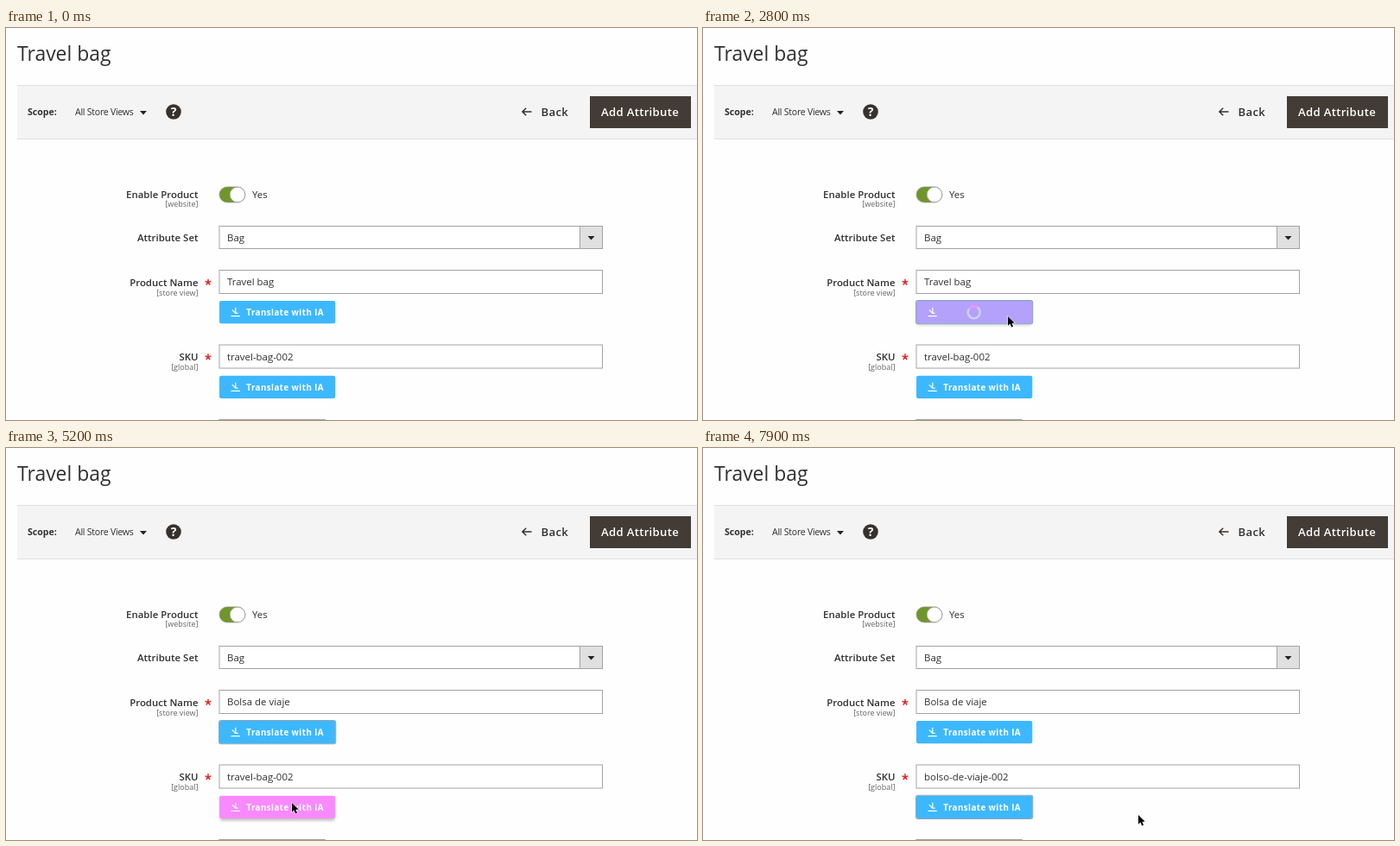
An HTML page that plays this animation: 800x454 px, repeating every 8000 ms.

```html
<!DOCTYPE html>
<html lang="en">
<head>
<meta charset="utf-8">
<title>Product form</title>
<style>
  html, body { margin: 0; width: 100%; height: 100%; overflow: hidden; background: #fefefe; }
  svg { display: block; width: 100vw; height: 100vh; }
  text { font: 11.45px "Open Sans", sans-serif; fill: #303030; }
  .label { font-weight: 600; text-anchor: end; }
  .note { font-size: 9px; fill: #666; text-anchor: end; }
  .action { font-size: 13.1px; font-weight: 600; letter-spacing: .33px; }
  .caption { font-size: 9.8px; font-weight: 700; letter-spacing: .41px; fill: #fff; }
  .field { fill: #fff; stroke: #a3a3a3; }
</style>
</head>
<body>
<svg id="stage" viewBox="0 0 800 454">
  <defs>
    <filter id="shadow" x="-10%" y="-30%" width="120%" height="180%">
      <feGaussianBlur stdDeviation="1.8"/>
    </filter>
    <path id="star" d="M0 0V-3.7M0 0L3.5-1.1M0 0L2.2 3M0 0L-2.2 3M0 0L-3.5-1.1" stroke="#e22626" stroke-width="1.5"/>
    <path id="down" d="M-4-2H4L0 2.5Z" fill="#222"/>
  </defs>
  <rect width="800" height="454" fill="#fefefe"/>
  <text x="13" y="38" style="font-size:22.9px">Travel bag</text>

  <rect x="13" y="66" width="787" height="63" fill="#f5f4f4"/>
  <path d="M13 66.5H800M13 128.5H800" stroke="#e0e0e0"/>
  <text x="25" y="101" style="font-size:10.6px;font-weight:700">Scope:</text>
  <text x="80" y="101" style="font-size:10.6px;letter-spacing:-.27px">All Store Views</text>
  <use href="#down" x="159" y="98"/>
  <circle cx="194" cy="97" r="8.8" fill="#37322f"/>
  <text x="194" y="102.2" text-anchor="middle" style="font-size:14px;font-weight:700;fill:#fff">?</text>
  <path d="M608.5 97H598M602.2 92.7L597.9 97L602.2 101.3" fill="none" stroke="#35302d" stroke-width="1.5"/>
  <text class="action" x="619.5" y="102">Back</text>
  <rect x="676" y="79" width="117" height="37" fill="#433b36"/>
  <text class="action" x="689" y="102" style="fill:#fff">Add Attribute</text>

  <text class="label" x="222.5" y="197">Enable Product</text>
  <text class="note" x="222.5" y="207">[website]</text>
  <rect x="247" y="184" width="30" height="18" rx="9" fill="#6f962a" stroke="#9a9a8c" stroke-width=".8"/>
  <circle cx="268" cy="193" r="8.8" fill="#fff" stroke="#a5a5a5" stroke-width=".9"/>
  <text x="285" y="197">Yes</text>

  <text class="label" x="222.5" y="247.3">Attribute Set</text>
  <rect class="field" x="247" y="229.5" width="443.5" height="26"/>
  <rect x="664.5" y="229.5" width="26" height="26" fill="#e0e0e0" stroke="#a3a3a3"/>
  <use href="#down" x="677.5" y="243"/>
  <text x="256" y="247">Bag</text>

  <text class="label" x="222.5" y="299">Product Name</text>
  <text class="note" x="222.5" y="309.5">[store view]</text>
  <use href="#star" x="234" y="294.5"/>
  <rect class="field" x="247" y="280.5" width="443.5" height="27"/>
  <text id="name" x="256" y="298"></text>

  <text class="label" x="222.5" y="385">SKU</text>
  <text class="note" x="222.5" y="395.7">[global]</text>
  <use href="#star" x="234" y="381"/>
  <rect class="field" x="247" y="367" width="443.5" height="27"/>
  <text id="sku" x="256" y="384.5"></text>

  <g id="buttons"></g>
  <path d="M246.5 455V453.5H369.5V455" fill="none" stroke="#a3a3a3"/>
  <path id="cursor" d="M0 0V10.8L2.4 8.6L4.2 12.4L6.1 11.5L4.4 7.9L7.6 7.6Z" fill="#000" stroke="#fff" stroke-width="1.1" paint-order="stroke"/>
</svg>
<script>
const LOOP = 8000;
const BLUE = [61, 184, 255], PINK = [249, 137, 255], BUSY = [108, 184, 249];
const $ = id => document.getElementById(id);

const ramp = (t, start, length) => Math.min(1, Math.max(0, (t - start) / length));
const ease = p => p * p * (3 - 2 * p);
const lerp = (a, b, p) => a + (b - a) * p;
const mix = (a, b, p) => a.map((v, i) => lerp(v, b[i], p));
const show = (el, on) => el.setAttribute("opacity", +on);

const buttons = [
  { y: 316, hover: 1200, click: 2600, done: 4000, blur: 5650, turn: 2800, angle: -10 },
  { y: 402.7, hover: 4800, click: 5650, done: 7100, blur: Infinity, turn: 6500, angle: 165 }
];

for (const b of buttons) {
  const g = document.createElementNS("http://www.w3.org/2000/svg", "g");
  g.setAttribute("transform", `translate(247 ${b.y})`);
  g.innerHTML = `
    <rect x="1" y="3" width="132.5" height="26" rx="2" fill="#555" filter="url(#shadow)"/>
    <rect width="134.3" height="26.3" rx="2.2"/>
    <rect x="-.4" y="-.4" width="135.1" height="27.1" rx="2.4" fill="none" stroke="#83a6bd" stroke-width="1.1"/>
    <path d="M13.5 17.6H23.8M18.8 7.8V14.4M14.8 10.4L18.8 14.4H21.6" fill="none" stroke="#fff" stroke-width="1.2"/>
    <text class="caption" x="31.3" y="16.9">Translate with IA</text>
    <g fill="none" stroke-width="2.3">
      <circle r="7" stroke="#d5dcfb" stroke-opacity=".85"/>
      <path d="M-4.95-4.95A7 7 0 0 1 4.95-4.95" stroke="#f58cf8"/>
    </g>`;
  [b.shadow, b.face, b.focus, b.icon, b.caption, b.spinner] = g.children;
  $("buttons").append(g);
}

// time, x, y
const path = [
  [900, 430, 400], [1350, 353, 334], [3200, 353, 334], [4000, 465, 335],
  [4300, 465, 335], [4950, 331, 411], [5750, 331, 411], [6400, 473, 418],
  [7350, 473, 418], [7850, 504, 425]
];

function cursorAt(t) {
  const next = path.findIndex(p => p[0] > t);
  if (next === 0) return path[0].slice(1);
  if (next < 0) return path.at(-1).slice(1);
  const a = path[next - 1], b = path[next];
  const p = ease(ramp(t, a[0], b[0] - a[0]));
  return [lerp(a[1], b[1], p), lerp(a[2], b[2], p)];
}

function drawButton(b, t) {
  const busy = t >= b.click && t < b.done;
  const hover = t < b.done ? ramp(t, b.hover, 250) : 0;
  const load = t < b.done ? ramp(t, b.click, 400) : 1 - ramp(t, b.done, 280);
  const color = mix(mix(BLUE, PINK, hover), BUSY, load);
  b.face.setAttribute("fill", `rgb(${color.map(Math.round)})`);
  b.shadow.setAttribute("opacity", .35 * hover * (1 - load));
  show(b.focus, t >= b.click && t < b.blur);
  show(b.caption, !busy);
  show(b.spinner, busy);
  const angle = b.angle + (t - b.turn) * .36;
  b.spinner.setAttribute("transform", `translate(66.7 13.3) rotate(${angle})`);
}

function draw(t) {
  buttons.forEach(b => drawButton(b, t));
  $("name").textContent = t < buttons[0].done ? "Travel bag" : "Bolsa de viaje";
  $("sku").textContent = t < buttons[1].done ? "travel-bag-002" : "bolso-de-viaje-002";
  show($("cursor"), t >= path[0][0]);
  $("cursor").setAttribute("transform", `translate(${cursorAt(t)})`);
}

const start = performance.now();
function tick() {
  const t = (performance.now() - start) % LOOP;
  draw(Math.floor(t / 100) * 100);
  requestAnimationFrame(tick);
}
tick();
</script>
</body>
</html>
```
